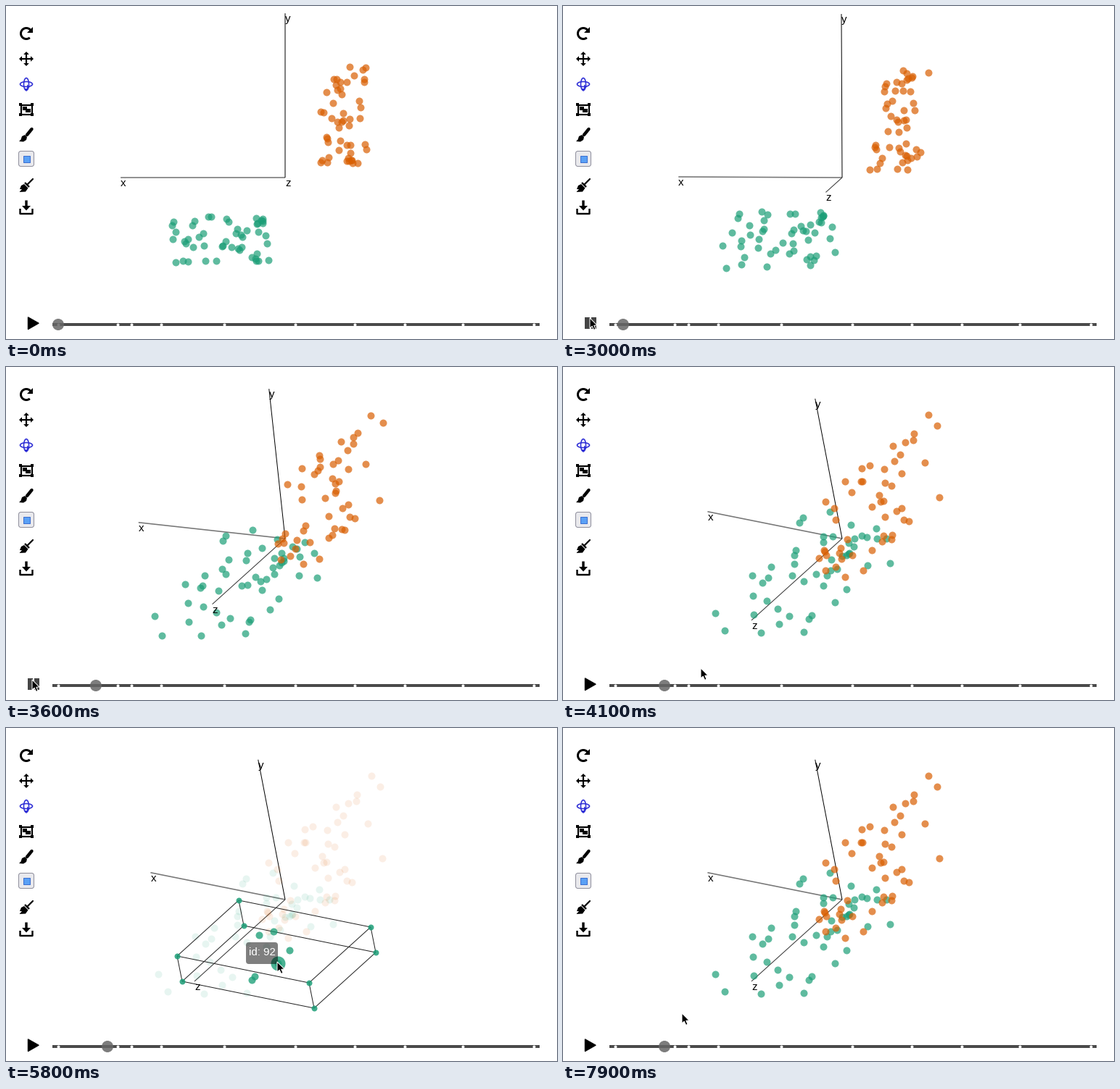
These frames come from a looping animation (760 px wide and 460 px high, 8 s). A matplotlib script:

```python
import itertools

import matplotlib.pyplot as plt
import numpy as np
from matplotlib.animation import FuncAnimation
from matplotlib.patches import Arc, Circle, Ellipse, FancyBboxPatch, Polygon, Rectangle

W, H, DPI = 760, 460, 80
PX = 72 / DPI
STEP, LOOP = 100, 8000
TEAL, ORANGE, BLUE = "#1b9e77", "#d95f02", "#2f2fd6"

ORIGIN = np.array([385.0, 237.0])
AXIS_LEN = 227
ALONG = np.array([0.670, 0.742])     # screen direction of the rotation axis
ACROSS = np.array([0.742, -0.670])

# (x, y, depth) on screen before the rotation; the six brushed points lead
teal_pts = [
    (345, 352, 7), (344, 349, 38), (346, 342, -57), (339, 347, -41),
    (299, 331, 34), (311, 333, 52), (348, 352, -75), (360, 328, 73),
    (362, 351, 120), (358, 317, 127), (322, 337, 151), (348, 312, -15),
    (320, 335, -90), (346, 301, 125), (290, 352, -96), (231, 298, 112),
    (229, 303, 105), (234, 312, -24), (230, 322, -113), (234, 354, -105),
    (260, 297, 136), (257, 303, -8), (279, 291, 25), (283, 291, -64),
]
orange_pts = [
    (474, 84, -38), (452, 101, -52), (456, 101, -106), (461, 105, 143),
    (442, 119, 20), (457, 116, 108), (480, 96, -51), (492, 88, -91),
    (496, 85, -140), (434, 146, 133), (438, 147, 79), (451, 134, 38),
    (494, 105, -138), (494, 101, 116), (449, 155, 36), (465, 148, 56),
    (459, 168, 118), (489, 140, -30), (463, 160, -139), (488, 155, -133),
    (478, 217, 111), (497, 198, -32), (477, 213, 37), (495, 191, -75),
    (485, 217, -90),
]
rng = np.random.default_rng(12)


def patch(n, x0, x1, y0, y1, d0, d1):
    return rng.uniform((x0, y0, d0), (x1, y1, d1), (n, 3))


teal = np.vstack([teal_pts,
                  patch(10, 242, 277, 314, 355, -100, 130),
                  patch(10, 297, 334, 288, 335, -90, 130),
                  patch(6, 344, 355, 288, 301, -20, 125)])
orange = np.vstack([orange_pts,
                    patch(16, 432, 487, 181, 218, -130, 110),
                    patch(9, 451, 498, 105, 165, -120, 110)])
for cloud in (teal, orange):
    cloud[:, :2] -= ORIGIN
axes3d = AXIS_LEN * np.array([(-1, 0, 0), (0, -1, 0), (0, 0, -1)])


def project(pts, angle):
    u = pts[:, :2] @ ALONG
    v = pts[:, :2] @ ACROSS * np.cos(angle) + pts[:, 2] * np.sin(angle)
    return ORIGIN + np.outer(u, ALONG) + np.outer(v, ACROSS)


fig = plt.figure(figsize=(W / DPI, H / DPI), dpi=DPI, facecolor="white")
ax = fig.add_axes([0, 0, 1, 1])
ax.set(xlim=(0, W), ylim=(H, 0))
ax.axis("off")


def line(pts, width, color="black", z=2, cap="butt"):
    xs, ys = zip(*pts)
    return ax.plot(xs, ys, color=color, lw=width * PX, zorder=z, snap=False,
                   solid_capstyle=cap, solid_joinstyle="round")[0]


def poly(pts, color="black", z=2, edge="none", width=0):
    return ax.add_patch(Polygon(pts, fc=color, ec=edge, lw=width * PX,
                                joinstyle="round", zorder=z))


def rect(x, y, w, h, color, z=2, edge="none", width=0):
    return ax.add_patch(Rectangle((x, y), w, h, fc=color, ec=edge,
                                  lw=width * PX, zorder=z))


def rounded(x, y, w, h, r, z=2, **style):
    box = FancyBboxPatch((x, y), w, h, boxstyle=f"round,pad=0,rounding_size={r}",
                         zorder=z, **style)
    return ax.add_patch(box)


def dots(diameter, color, alpha, z):
    return ax.scatter([], [], s=(diameter * PX) ** 2, c=color, alpha=alpha,
                      linewidths=0, zorder=z)


def label(text, size, color="black", z=5, **kw):
    return ax.text(0, 0, text, family="Liberation Sans", size=size * PX,
                   color=color, zorder=z, **kw)


def toolbar():
    # reset
    ax.add_patch(Arc((28, 38), 15, 15, theta1=50, theta2=325, lw=3 * PX))
    poly([(37, 29), (37, 37), (29, 37)])
    # pan
    line([(21, 73), (35, 73)], 2.2)
    line([(28, 66), (28, 80)], 2.2)
    for dx, dy in ((1, 0), (-1, 0), (0, 1), (0, -1)):
        tip = np.array([28 + 10 * dx, 73 + 10 * dy])
        base = tip - 4 * np.array([dx, dy])
        side = 3.8 * np.array([dy, dx])
        poly([tip, base + side, base - side])
    # orbit
    for w, h in ((7, 17), (17, 7)):
        ax.add_patch(Ellipse((28, 108), w, h, fc="none", ec=BLUE, lw=1.6 * PX))
    poly([(29, 108.5), (29, 115), (33, 111.7)], BLUE)
    poly([(25, 114), (31, 114), (28, 118)], BLUE)
    # group
    rect(20.5, 136.5, 15, 13, "none", edge="black", width=2.2)
    for x, y in itertools.product((18, 34), (134, 148)):
        rect(x, y, 4, 4, "black")
    rect(23, 139, 6, 5, "black")
    rect(27, 142, 6.5, 5, "black")
    # brush
    line([(35.5, 170), (29, 178)], 4.4, cap="round")
    poly([(26, 178), (29, 181), (28, 185), (24, 187.5), (18, 187),
          (20.5, 184.5), (22, 180)])
    # box selection
    rounded(17.5, 200.5, 21, 21, 3, fc="#e9e9ed", ec="#8f8f9d", lw=PX)
    rect(23.5, 206.5, 9, 9, "#5aa0f5", edge="#3d6fd0", width=1)
    # broom
    line([(37, 239), (30, 246)], 2.2, cap="round")
    line([(26, 244), (32, 250)], 2.4)
    poly([(25, 246), (30.5, 251.5), (27, 256.5), (18.5, 257), (22, 253),
          (19, 253), (21, 248)])
    # download
    line([(28, 268.5), (28, 278)], 3.4)
    poly([(22, 276), (34, 276), (28, 282.5)])
    line([(19.5, 280), (19.5, 287), (36.5, 287), (36.5, 280)], 2.4)


toolbar()

# timeline
line([(64, 440), (736, 440)], 4, "#4a4a4a")
ticks = [72, 154, 173, 214, 301, 399, 481, 550, 630, 728]
ax.scatter(ticks, [440] * len(ticks), s=(4 * PX) ** 2, c="white",
           linewidths=0, zorder=3)
handle = ax.add_patch(Circle((72, 440), 8, fc="#666666", alpha=0.85, lw=0, zorder=4))
play = poly([(30.5, 430), (30.5, 446.5), (45, 438.2)], edge="black", width=1.4)
pause = [rect(x, 430, 7, 16, "#444444") for x in (30, 39)]

# scene
spokes = [line([ORIGIN, ORIGIN], w, c, z=2)
          for w, c in ((1.6, "#777777"), (1, "black"), (1, "#333333"))]
names = [label(s, 15) for s in "xyz"]
clouds = [(teal, dots(10, TEAL, 0.7, 3)), (orange, dots(10, ORANGE, 0.7, 3))]
brushed = dots(10, TEAL, 0.75, 4)
hovered = dots(20, TEAL, 0.8, 4)

# selection box
corner = np.array([321, 238])
sides = np.array([(182, 37), (7, 35), (-85, 77)])
bits = list(itertools.product((0, 1), repeat=3))
verts = {b: corner + np.array(b) @ sides for b in bits}
cage = [line([verts[a], verts[b]], 1, "#222222", z=3)
        for a, b in itertools.combinations(bits, 2)
        if sum(i != j for i, j in zip(a, b)) == 1]
knobs = dots(8, TEAL, 0.85, 4)
knobs.set_offsets(list(verts.values()))
cage.append(knobs)

tip_box = rounded(0, 0, 44, 30, 4, z=6, fc="black", alpha=0.5, lw=0)
tip_text = label("id: 92", 15, "white", 7, ha="center", va="center")

ARROW = np.array([(0, 0), (0, 14), (3.2, 11.2), (5.6, 16.4), (8, 15.3),
                  (5.8, 10.3), (10, 10)])
arrow = poly(ARROW, z=8, edge="white", width=1)

# time, x, y of the pointer
PATH = np.array([
    (1000, -6, 398), (1300, 14, 414), (1700, 36, 428), (1900, 36, 429),
    (2400, 37, 431), (3000, 37, 431), (3600, 36, 432), (3800, 37, 432),
    (4100, 190, 416), (4350, 300, 330), (4600, 366, 268), (5000, 373, 320),
    (5150, 375, 328), (5300, 374, 323), (6300, 374, 323), (6700, 305, 377),
    (7000, 235, 325), (7200, 214, 287), (7300, 214, 282), (7500, 214, 282),
    (7900, 164, 394),
])


def draw(frame):
    t = frame * STEP
    pointer = np.array([np.interp(t, PATH[:, 0], PATH[:, k]) for k in (1, 2)])
    arrow.set_visible(t >= 1000)
    arrow.set_xy(pointer + ARROW)

    played = np.clip((t - 2840) * 0.0683, 0, 68)
    angle = np.radians(0.705 * played)
    handle.center = (72 + played, 440)

    playing = 2900 <= t <= 3800
    over_play = t >= 1000 and 29 <= pointer[0] <= 47 and pointer[1] > 424
    play.set_visible(not playing)
    play.set_facecolor("#444444" if over_play else "black")
    play.set_edgecolor("#444444" if over_play else "black")
    for bar in pause:
        bar.set_visible(playing)

    for end, spoke, name in zip(project(axes3d, angle), spokes, names):
        spoke.set_data(*zip(ORIGIN, end))
        name.set_position(end + (0, 12))

    selected = 5800 <= t < 7500
    hover = 5000 <= t < 6400
    for pts, art in clouds:
        art.set_offsets(project(pts, angle))
        art.set_alpha(0.1 if selected else 0.7)
    spots = project(teal[:6], angle)
    brushed.set_offsets(spots)
    brushed.set_visible(selected)
    hovered.set_offsets(spots[:1])
    hovered.set_visible(hover)
    for part in cage:
        part.set_visible(selected)

    tip_box.set_visible(hover)
    tip_text.set_visible(hover)
    tip_box.set_x(pointer[0] - 43)
    tip_box.set_y(pointer[1] - 27)
    tip_text.set_position(pointer + (-21, -13))
    return []


anim = FuncAnimation(fig, draw, frames=LOOP // STEP, interval=STEP,
                     init_func=lambda: draw(0), repeat=True, repeat_delay=0)
plt.show()
```
